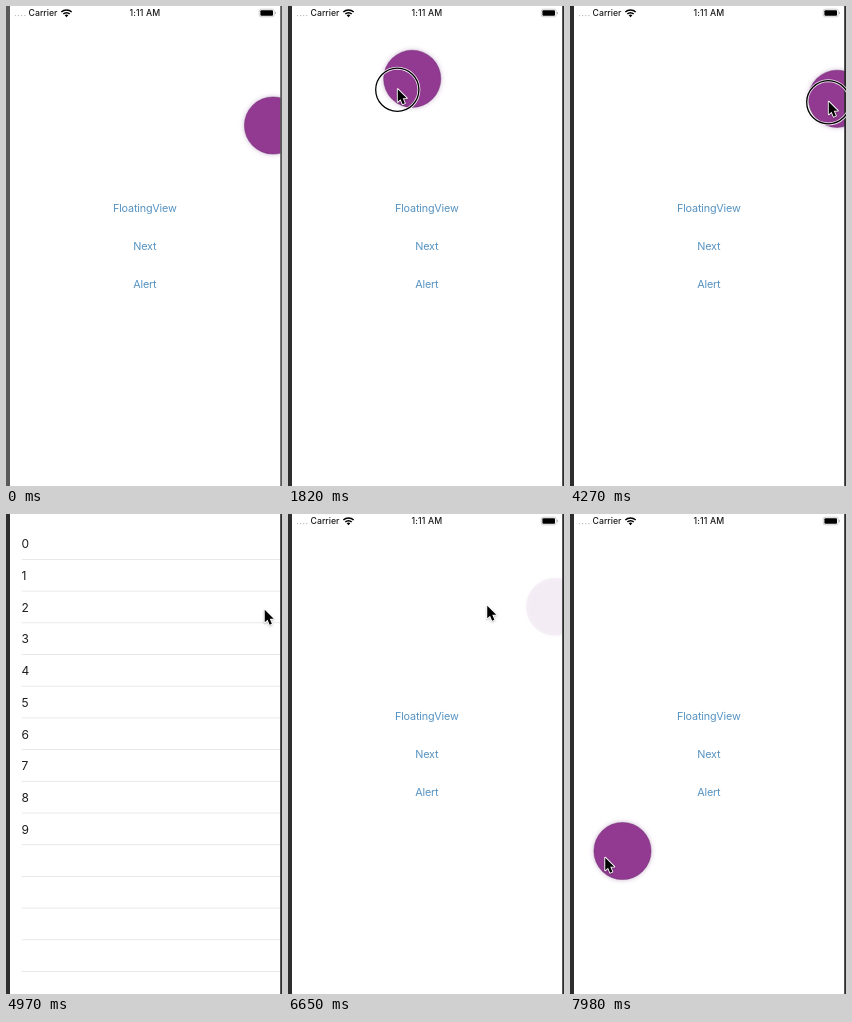
These frames come from a looping animation (276x480 px, 8 s). An HTML page with a canvas:

```html
<!DOCTYPE html>
<html lang="en">
<head>
<meta charset="utf-8">
<title>Floating ball</title>
<style>
html, body { margin: 0; width: 100%; height: 100%; overflow: hidden; background: #fff; }
canvas { display: block; width: 276px; height: 480px; }
</style>
</head>
<body>
<canvas id="stage"></canvas>
<script>
const W = 276, H = 480, LOOP = 8000, R = 28.6;
const FONT = 'Inter, Roboto, sans-serif';
const canvas = document.getElementById('stage');
const ctx = canvas.getContext('2d');
const dpr = window.devicePixelRatio || 1;
canvas.width = W * dpr;
canvas.height = H * dpr;

const clamp = v => Math.max(0, Math.min(1, v));
const span = (t, a, b) => clamp((t - a) / (b - a));
const smooth = k => k * k * (3 - 2 * k);
const easeOut = k => 1 - Math.pow(1 - k, 3);
const mix = (a, b, k) => a + (b - a) * k;

// Pointer moves; sag bends the way down in the middle.
const move = (from, to, x, y, sag = 0) => ({ from, to, x, y, sag });
const MOVES = [
  move(140, 350, 154, 374),
  move(560, 1050, 251.5, 129.5),
  move(1330, 1820, 109, 82.5, 145),
  move(1820, 2400, 266, 103, -15),
  move(3400, 3640, 258, 95),
  move(5430, 5660, 27.5, 112),
  move(5740, 5870, 18.5, 112),
  move(6000, 6520, 198.5, 91),
  move(6680, 6960, 249, 98.5),
  move(7120, 7830, 34.5, 343)
];
const PRESSES = [[1190, 2500], [4190, 4480], [5870, 6530], [7030, 7930]];

function tip(t) {
  const p = { x: 217, y: 5 };
  for (const m of MOVES) {
    if (t < m.from) break;
    const k = smooth(span(t, m.from, m.to));
    p.x = mix(p.x, m.x, k);
    p.y = mix(p.y, m.y, k) + m.sag * Math.sin(Math.PI * k);
  }
  return p;
}

// The ball rests, is dragged, snaps to the edge, and is dragged again.
function ballAt(t, p) {
  if (t < 1330) return { x: 267, y: 119.5 };
  if (t < 2560) return { x: p.x + 15.2, y: p.y - 9.7 };
  if (t < 7120) return { x: mix(281.2, 267, easeOut(span(t, 2560, 3250))), y: 92.8 };
  return { x: p.x + 18, y: p.y - 6 };
}

function label(text, x, y, size, color, align = 'left', weight = 400, spacing = 0) {
  ctx.font = `${weight} ${size}px ${FONT}`;
  ctx.letterSpacing = spacing + 'px';
  ctx.textAlign = align;
  ctx.fillStyle = color;
  ctx.fillText(text, x, y);
}

function disc(x, y, r, color) {
  ctx.fillStyle = color;
  ctx.beginPath();
  ctx.arc(x, y, r, 0, 7);
  ctx.fill();
}

function box(x, y, w, h, r) {
  ctx.beginPath();
  ctx.roundRect(x, y, w, h, r);
}

function statusBar(alpha) {
  ctx.save();
  ctx.globalAlpha = alpha;
  for (let i = 0; i < 4; i++) disc(9.5 + i * 3.1, 9.6, 0.7, '#b4b4b4');
  label('Carrier', 22.6, 10.4, 8.7, '#1c1c1c', 'left', 500);
  label('1:11 AM', 139, 10.4, 8.7, '#1c1c1c', 'center', 500, 0.15);
  ctx.strokeStyle = '#000';
  ctx.lineWidth = 1.5;
  for (const r of [4.5, 7.3]) {
    ctx.beginPath();
    ctx.arc(60.5, 11.2, r, -Math.PI * 0.75, -Math.PI * 0.25);
    ctx.stroke();
  }
  ctx.fillStyle = '#000';
  ctx.beginPath();
  ctx.moveTo(60.5, 11.2);
  ctx.arc(60.5, 11.2, 2.6, -Math.PI * 0.75, -Math.PI * 0.25);
  ctx.fill();
  ctx.strokeStyle = '#b0b0b0';
  ctx.lineWidth = 0.6;
  box(253.2, 3.2, 15, 7.6, 2);
  ctx.stroke();
  ctx.fillStyle = '#000';
  box(254.4, 4.2, 12.6, 5.6, 1);
  ctx.fill();
  ctx.fillStyle = '#b0b0b0';
  ctx.fillRect(268.9, 5.8, 0.9, 2.4);
  ctx.restore();
}

function home(shift) {
  ['FloatingView', 'Next', 'Alert'].forEach((s, i) =>
    label(s, 138.8 + shift, 206 + i * 38.2, 10.8, '#5793c2', 'center', 400, -0.18));
}

function ball(p, alpha) {
  if (alpha <= 0) return;
  ctx.save();
  ctx.globalAlpha = alpha;
  ctx.shadowColor = 'rgba(120,50,130,.4)';
  ctx.shadowBlur = 5 * dpr;
  disc(p.x, p.y, R, '#923a91');
  ctx.shadowColor = 'transparent';
  ctx.strokeStyle = 'rgba(95,35,100,.5)';
  ctx.lineWidth = 0.8;
  ctx.stroke();
  ctx.restore();
}

function list(x) {
  ctx.fillStyle = '#fff';
  ctx.fillRect(x, 0, W, H);
  for (let i = 0; i < 14; i++) {
    const y = 30 + i * 31.7;
    if (i < 10) label(i, x + 15.5, y + 4.3, 12, '#1c1c1c');
    ctx.fillStyle = '#e3e3e3';
    ctx.fillRect(x + 16, y + 15, W, 0.8);
  }
}

function listPage(t) {
  if (t < 4520 || t >= 6640) return;
  ctx.save();
  if (t < 5200) {
    // The page grows out of the ball.
    const k = smooth(span(t, 4520, 4980));
    box(mix(238, 0, k), mix(63.5, 0, k), mix(58, W, k), mix(58, H, k), mix(29, 0, k));
    ctx.clip();
    list(0);
  } else {
    const x = slide(t);
    ctx.shadowColor = 'rgba(0,0,0,.2)';
    ctx.shadowBlur = 6 * dpr;
    ctx.fillStyle = '#fff';
    ctx.fillRect(x, 0, W, H);
    ctx.shadowColor = 'transparent';
    list(x);
  }
  ctx.restore();
}

// Edge swipe: the page follows the pointer, then leaves.
function slide(t) {
  if (t < 6000) return 0;
  return mix(tip(t).x - 18.5, W, smooth(span(t, 6500, 6635)));
}

function ring(p) {
  for (const [color, width] of [['rgba(255,255,255,.85)', 3], ['#000', 1.3]]) {
    ctx.strokeStyle = color;
    ctx.lineWidth = width;
    ctx.beginPath();
    ctx.arc(p.x + 0.3, p.y + 1.3, 21.6, 0, 7);
    ctx.stroke();
  }
}

function arrow(p) {
  ctx.save();
  ctx.translate(p.x + 0.2, p.y + 0.4);
  ctx.scale(0.91, 0.91);
  ctx.beginPath();
  [[0.6, 0.4], [0.6, 14.2], [3.7, 11.3], [6, 16.8], [8.4, 15.8], [6.1, 10.4], [10.5, 10.2]]
    .forEach(([x, y]) => ctx.lineTo(x, y));
  ctx.closePath();
  ctx.lineJoin = 'round';
  ctx.shadowColor = 'rgba(0,0,0,.25)';
  ctx.shadowBlur = 2 * dpr;
  ctx.shadowOffsetY = dpr;
  ctx.strokeStyle = '#fff';
  ctx.lineWidth = 2;
  ctx.stroke();
  ctx.shadowColor = 'transparent';
  ctx.fillStyle = '#000';
  ctx.fill();
  ctx.restore();
}

function draw(t) {
  ctx.setTransform(dpr, 0, 0, dpr, 0, 0);
  ctx.fillStyle = '#fff';
  ctx.fillRect(0, 0, W, H);
  const p = tip(t);
  const away = t >= 5200 && t < 6640;
  home(away ? -0.3 * (W - slide(t)) : 0);
  if (t < 4660) ball(ballAt(t, p), 1 - span(t, 4500, 4660));
  listPage(t);
  statusBar(t < 6000 ? 1 - span(t, 4530, 4800) : span(t, 6380, 6640));
  if (t > 6600) ball(ballAt(t, p), span(t, 6632, 6930));

  ctx.fillStyle = t < 630 ? '#595959' : '#2d2d2d';
  ctx.fillRect(0, 0, 4, H);
  ctx.fillRect(274.2, 0, 2, H);

  if (PRESSES.some(([a, b]) => t >= a && t < b)) ring(p);
  if (t >= 140) arrow(p);
}

const start = performance.now();
function tick() {
  draw((performance.now() - start) % LOOP);
  requestAnimationFrame(tick);
}
tick();
</script>
</body>
</html>
```
